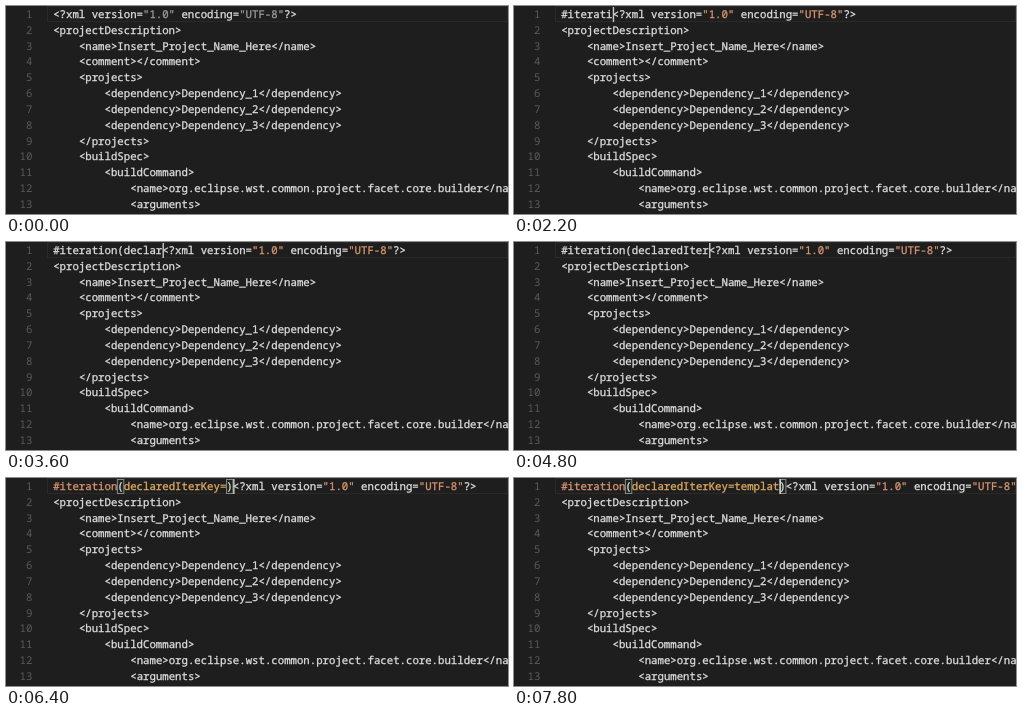
These frames come from a looping animation (502x208 px, 8000 ms). An HTML page:

```html
<!DOCTYPE html>
<html lang="en">
<head>
<meta charset="utf-8">
<title>Typing in a code editor</title>
<style>
  html, body { margin: 0; width: 100%; height: 100%; overflow: hidden; background: #1e1e1e; }
  svg { display: block; width: 502px; height: 208px; background: #1e1e1e; }
  text {
    font: 10.7px "Noto Sans Mono", "DejaVu Sans Mono", monospace;
    white-space: pre;
    text-rendering: geometricPrecision;
    color: #dedede;
    fill: currentColor;
    stroke: currentColor;
    stroke-width: 0.3px;
  }
  .number { color: #5a5a5a; text-anchor: end; stroke: none; }
  .plain { color: #9c9c9c; }
  .string, .directive { color: #d89672; }
  .args { color: #e0ab62; }
  .current { fill: none; stroke: #292929; }
  .bracket { fill: #00640019; stroke: #888; }
  #caret { fill: #c8c8c6; }
</style>
</head>
<body>
<svg id="stage" viewBox="0 0 502 208" xmlns="http://www.w3.org/2000/svg">
  <rect class="current" x="41.5" y="0.5" width="460" height="15"/>
  <rect id="open" class="bracket" y="1.5" width="6.4" height="14"/>
  <rect id="close" class="bracket" y="1.5" width="6.4" height="14"/>
  <rect id="caret" y="1" width="1.4" height="15"/>
</svg>
<script>
const NS = "http://www.w3.org/2000/svg";
const LOOP = 8000, LEFT = 47.2, CHAR = 6.42, BASE = 12, LINE = 15.83;
const CLOSE_AT = 6000, COLOR_AT = 6200, MATCH_AT = 6400, BACK_AT = 6800;
const DIRECTIVE = "#iteration";
const TYPED = DIRECTIVE + "(declaredIterKey=templat";
// Indent level and text of the lines below the header
const LINES = [
  [0, "<projectDescription>"],
  [1, "<name>Insert_Project_Name_Here</name>"],
  [1, "<comment></comment>"],
  [1, "<projects>"],
  [2, "<dependency>Dependency_1</dependency>"],
  [2, "<dependency>Dependency_2</dependency>"],
  [2, "<dependency>Dependency_3</dependency>"],
  [1, "</projects>"],
  [1, "<buildSpec>"],
  [2, "<buildCommand>"],
  [3, "<name>org.eclipse.wst.common.project.facet.core.builder</name>"],
  [3, "<arguments>"]
];
// Time in ms and number of characters typed by then
const KEYS = [
  [0, 0], [1200, 1],
  [1600, 3], [1800, 4], [2000, 6], [2200, 8], [2400, 9], [2600, 10],
  [2800, 11], [3000, 13], [3200, 14], [3400, 16], [3600, 17], [3800, 19],
  [4200, 20], [4400, 21], [4600, 22], [4800, 23], [5000, 24], [5200, 26],
  [5400, 27], [7200, 29], [7400, 31], [7600, 33], [7800, 34]
];

const stage = document.getElementById("stage");
const caret = document.getElementById("caret");
const open = document.getElementById("open");
const close = document.getElementById("close");
const column = n => LEFT + n * CHAR;

function addText(x, row, content, name = "") {
  const el = document.createElementNS(NS, "text");
  el.setAttribute("x", x);
  el.setAttribute("y", BASE + row * LINE);
  el.setAttribute("class", name);
  el.textContent = content;
  stage.insertBefore(el, caret);
  return el;
}

function span([content, name = ""]) {
  const el = document.createElementNS(NS, "tspan");
  el.setAttribute("class", name);
  el.textContent = content;
  return el;
}

const header = quoted => [
  ["<?xml version="], ['"1.0"', quoted],
  [" encoding="], ['"UTF-8"', quoted], ["?>"]
];

const first = addText(LEFT, 0, "");
LINES.forEach(([level, content], i) => addText(column(level * 4), i + 1, content));
for (let i = 0; i <= LINES.length; i++) addText(26.3, i, i + 1, "number");
open.setAttribute("x", column(DIRECTIVE.length));

let shown = "";

function draw(t) {
  const count = KEYS.filter(([time]) => time <= t).pop()[1];
  const closed = t >= CLOSE_AT, colored = t >= COLOR_AT, matched = t >= MATCH_AT;
  const end = closed ? ")" : "";
  const typed = TYPED.slice(0, count);
  const state = typed + end + colored;

  if (state !== shown) {
    const parts = colored
      ? [[DIRECTIVE, "directive"], ["("], [typed.slice(DIRECTIVE.length + 1), "args"], [end]]
      : [[typed + end]];
    first.replaceChildren(...parts.concat(header(count ? "string" : "plain")).map(span));
    shown = state;
  }

  const pos = closed && t < BACK_AT ? count + 1 : count;
  caret.setAttribute("x", column(pos) + 0.2);
  caret.setAttribute("visibility", count ? "visible" : "hidden");
  close.setAttribute("x", column(count));
  for (const box of [open, close]) box.setAttribute("visibility", matched ? "visible" : "hidden");
}

const start = performance.now();
function tick() {
  draw((performance.now() - start) % LOOP);
  requestAnimationFrame(tick);
}
tick();
</script>
</body>
</html>
```
